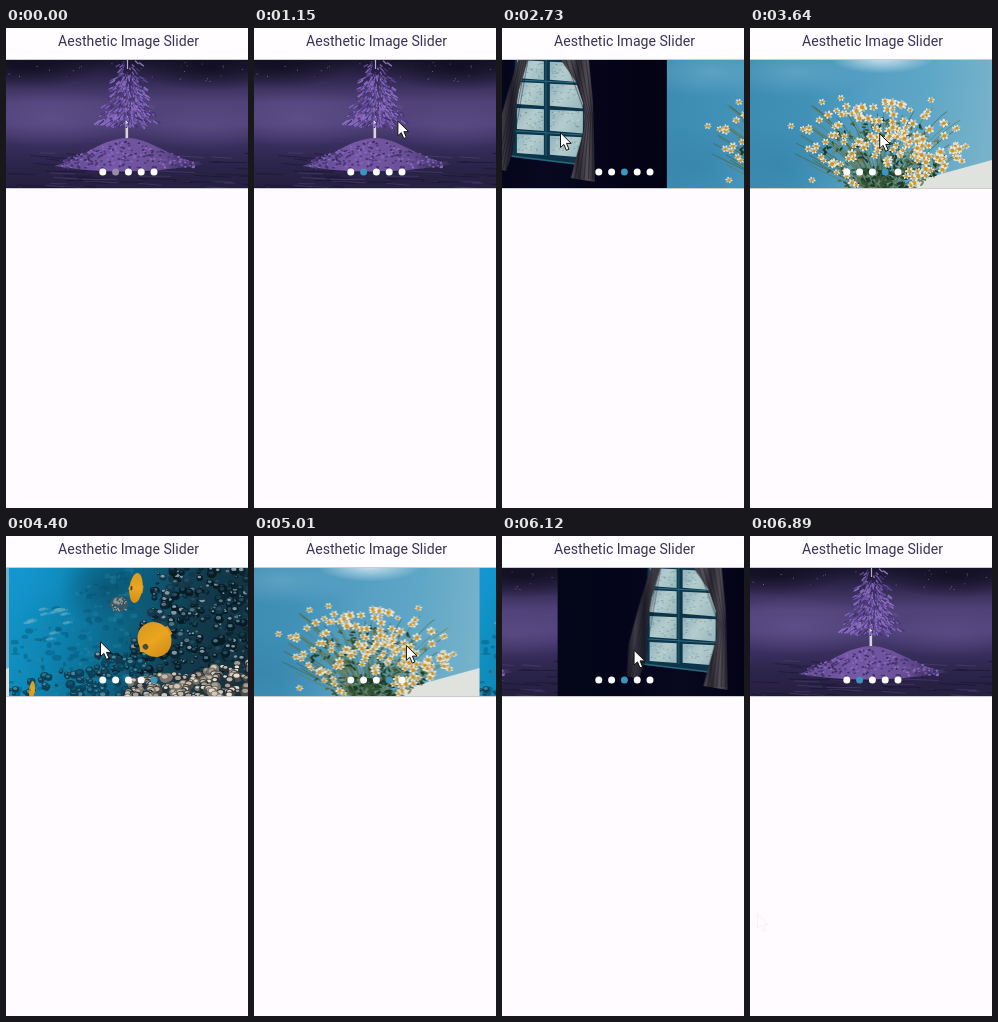
Write an HTML page with a canvas that moves like this. It is 242 by 480 pixels and loops after 8.08 s.

```html
<!DOCTYPE html>
<html lang="en">
<head>
<meta charset="utf-8">
<title>Aesthetic Image Slider</title>
<style>
html, body { margin: 0; width: 100%; height: 100%; overflow: hidden; background: #fffbff; }
#stage { position: relative; width: 242px; height: 480px; overflow: hidden; }
h1 { position: absolute; left: 0; top: 0; width: 245px; height: 31px; margin: 0; text-align: center;
  font: 400 14.1px/28px Roboto, sans-serif; color: #393257; background: #fffdff; white-space: nowrap; }
h1 span { display: block; transform: translateY(-.6px); }
#slider { position: absolute; left: 0; top: 32px; width: 242px; height: 128px; overflow: hidden;
  background: #fffbff; }
#strip { position: absolute; left: 0; top: 0; display: flex; will-change: transform; }
canvas { width: 242px; height: 128px; flex: none; display: block; }
.edge { position: absolute; left: 0; top: 31px; width: 242px; height: 1px; background: #c9cdd0; }
.edge + .edge { top: 160px; }
.dot { position: absolute; left: 0; top: 0; width: 7px; height: 7px; border-radius: 50%; background: #fbfbfb; }
#cursor { position: absolute; left: 0; top: 0; overflow: visible; }
</style>
</head>
<body>
<div id="stage">
  <h1><span>Aesthetic Image Slider</span></h1>
  <div class="edge"></div><div class="edge"></div>
  <div id="slider"><div id="strip"></div></div>
  <svg id="cursor" width="13" height="20" viewBox="0 0 13 20">
    <path d="M.5 .8V15.5L3.9 12.4L6.4 18.3L9 17.2L6.5 11.4H11.2Z" fill="#fff" stroke="#111" stroke-width="1"/>
  </svg>
</div>
<script>
const W = 242, H = 128, LOOP = 8080;
const slider = document.getElementById('slider');
const strip = document.getElementById('strip');
const cursor = document.getElementById('cursor');

function random(seed) {
  return () => {
    seed = (seed * 16807) % 2147483647;
    return seed / 2147483647;
  };
}

function shade(c, x0, y0, x1, y1, colors) {
  const g = c.createLinearGradient(x0, y0, x1, y1);
  colors.forEach((k, i) => g.addColorStop(i / (colors.length - 1), k));
  return g;
}

function poly(c, color, ...pts) {
  c.fillStyle = color;
  c.beginPath();
  for (let i = 0; i < pts.length; i += 2) c.lineTo(pts[i], pts[i + 1]);
  c.closePath();
  c.fill();
}

function oval(c, color, x, y, rx, ry = rx, turn = 0) {
  c.fillStyle = color;
  c.beginPath();
  c.ellipse(x, y, rx, ry, turn, 0, 7);
  c.fill();
}

function glow(c, color, x, y, r, squash) {
  c.save();
  c.translate(x, y);
  c.scale(1, squash);
  const g = c.createRadialGradient(0, 0, 0, 0, 0, r);
  g.addColorStop(0, color);
  g.addColorStop(1, color.replace(/[\d.]+\)$/, '0)'));
  oval(c, g, 0, 0, r);
  c.restore();
}

function line(c, color, width, x0, y0, x1, y1) {
  c.strokeStyle = color;
  c.lineWidth = width;
  c.beginPath();
  c.moveTo(x0, y0);
  c.lineTo(x1, y1);
  c.stroke();
}

function tree(c) {
  const r = random(41);
  c.fillStyle = shade(c, 0, 0, 0, H, ['#17142a', '#342b55', '#514379', '#50427a', '#382e5c', '#2b2449', '#251f40']);
  c.fillRect(0, 0, W, H);
  glow(c, 'rgba(103,86,148,.55)', 45, 58, 75, .4);
  glow(c, 'rgba(98,82,142,.5)', 200, 66, 70, .35);
  glow(c, 'rgba(14,12,28,.75)', 20, 6, 75, .3);
  glow(c, 'rgba(14,12,28,.75)', 205, 8, 75, .3);
  for (let i = 0; i < 40; i++) oval(c, `rgba(205,196,232,${r() * .7})`, r() * W, r() * 22, .5);
  for (let i = 0; i < 60; i++) {
    const x = r() * W, y = 92 + r() * 36;
    line(c, i % 3 ? 'rgba(21,17,40,.5)' : 'rgba(104,86,150,.35)', 1, x, y, x + 10 + r() * 30, y + r() * 2);
  }
  // island
  c.beginPath();
  c.moveTo(48, 106);
  c.bezierCurveTo(78, 98, 92, 80, 120, 78);
  c.bezierCurveTo(146, 78, 162, 98, 198, 104);
  c.quadraticCurveTo(122, 118, 48, 106);
  c.fillStyle = shade(c, 50, 0, 198, 0, ['#5d478c', '#7658a8', '#6c5199', '#392d60']);
  c.fill();
  for (let i = 0; i < 340; i++) {
    const x = 56 + r() * 132, u = Math.abs(x - 120) / 75;
    const top = 80 + 25 * Math.pow(u, 1.25);
    oval(c, ['#8a69ba', '#4d3a78', '#6f53a0', '#3c2f62'][i % 4], x, top + r() * (108 - top), 1.3, .9);
  }
  // branches
  c.fillStyle = '#d9d3df';
  c.fillRect(119.5, 56, 3.5, 22);
  line(c, '#5b4a6d', 1, 122.5, 60, 122.5, 78);
  for (let i = 0; i < 620; i++) {
    const v = Math.sqrt(r()), y = v * 65;
    const half = (11 + v * 19) * (.72 + .28 * Math.sin(y * .75));
    const side = r() * 2 - 1, x = 122 + side * half;
    line(c, ['#7d60b6', '#614893', '#8d70c4', '#44336f'][i % 4], 1.3, x, y, x + side * 5, y + 2 + r() * 2);
  }
  line(c, '#b9aad0', 1.2, 121.5, 0, 121.5, 9);
}

function windowRoom(c) {
  const r = random(87);
  c.fillStyle = shade(c, 0, 0, W, 0, ['#050719', '#04051a', '#080820', '#050418', '#030313']);
  c.fillRect(0, 0, W, H);
  poly(c, '#0d3448', 90, 0, 163, 0, 161, 106, 86, 97);
  const cols = [[92, 119], [125, 158]], rows = [[0, 18], [22, 44], [48, 69], [74, 93]];
  const tilt = x => (x - 92) * .05;
  for (const [a, b] of cols) for (const [t, d] of rows) {
    const fill = shade(c, a, t, b, d, ['#8fb2bc', '#b4ccce', '#98b9bd']);
    poly(c, fill, a, t + tilt(a), b, t + tilt(b), b, d + tilt(b) * 1.4, a, d + tilt(a));
  }
  for (let i = 0; i < 230; i++) {
    const col = cols[i % 2], row = rows[(i >> 1) % 4];
    oval(c, i % 3 ? 'rgba(70,105,112,.4)' : 'rgba(210,226,225,.6)',
      col[0] + 1 + r() * (col[1] - col[0] - 2), row[0] + 3 + r() * (row[1] - row[0] - 4), .9, .6);
  }
  line(c, '#2b7086', 1, 92, 20, 158, 23);
  line(c, '#2b7086', 1, 90, 71, 158, 75);
  line(c, '#256479', 1, 121, 0, 121, 96);
  line(c, '#28677d', 1.5, 86, 96, 160, 105);
  // curtains
  poly(c, shade(c, 68, 0, 96, 0, ['#15141f', '#3d3b44', '#201f2a', '#4a474c']),
    93, 0, 103, 0, 94, 30, 89, 60, 88, 92, 81, 111, 69, 108, 71, 76, 83, 32);
  poly(c, shade(c, 136, 0, 171, 0, ['#37353c', '#57525a', '#2b2933', '#555058', '#26242e']),
    136, 0, 164, 0, 168, 42, 169, 82, 170, 122, 146, 118, 151, 98, 159, 70, 159, 46, 151, 22);
  for (let i = 0; i < 5; i++) {
    line(c, 'rgba(12,11,22,.5)', 1, 141 + i * 5, 0, 161 + i * 1.6, 56);
    line(c, 'rgba(12,11,22,.5)', 1, 161 + i * 1.6, 56, 150 + i * 4.5, 119);
    line(c, 'rgba(10,10,25,.45)', 1, 95 + i * 2, 0, 72 + i * 3, 109);
  }
}

function daisy(c, x, y, s, turn) {
  for (let k = 0; k < 6; k++) {
    const a = turn + k * Math.PI / 3;
    oval(c, k % 3 ? '#eae6d4' : '#bfbeb0', x + Math.cos(a) * s * .62, y + Math.sin(a) * s * .52, s * .42, s * .25, a);
  }
  oval(c, '#cf9524', x, y + .3, s * .43, s * .4);
}

function flowers(c) {
  const r = random(29);
  c.fillStyle = shade(c, 0, 0, W, 30, ['#3d8bb1', '#4090b7', '#559fc3', '#5fa7c7', '#76b2ca']);
  c.fillRect(0, 0, W, H);
  glow(c, 'rgba(120,182,208,.5)', 45, 12, 75, .35);
  glow(c, 'rgba(214,232,240,.95)', 132, -2, 52, .3);
  glow(c, 'rgba(52,128,166,.5)', 25, 105, 70, .6);
  poly(c, '#e0e2de', 150, H, 180, 117, W, 100, W, H);
  for (let i = 0; i < 75; i++) {
    const x = 45 + r() * 170, y = 45 + r() * 60;
    c.strokeStyle = i % 2 ? '#667b50' : '#48643f';
    c.lineWidth = .7;
    c.beginPath();
    c.moveTo(x, y);
    c.quadraticCurveTo(x * .6 + 53, y + 18, 133 + (x - 133) * .15, 130);
    c.stroke();
  }
  for (let i = 0; i < 330; i++) {
    const a = r() * 7, d = Math.sqrt(r());
    oval(c, ['#3b5434', '#56693f', '#1d3a26', '#76825a'][i % 4],
      132 + Math.cos(a) * d * 62, 96 + Math.sin(a) * d * 38, 2.4, 1, r() * 3);
  }
  for (let i = 0; i < 60; i++) oval(c, i % 2 ? '#1d3a26' : '#335433', 112 + r() * 44, 108 + r() * 20, 3, 1.4, r() * 3);
  for (let i = 0; i < 175; i++) {
    const a = r() * 7, d = Math.pow(r(), .55);
    const x = 132 + Math.cos(a) * d * 80, y = 84 + Math.sin(a) * d * 45;
    if (y > 106 && Math.abs(x - 132) < 22 || y > 112 && x > 178) continue;
    daisy(c, x, y, 3.2 + r() * 1.9, a);
  }
  for (const [x, y] of [[41, 66], [53, 69], [72, 42], [91, 38], [207, 68], [216, 86], [212, 101], [62, 120], [181, 40]])
    daisy(c, x, y, 3.6, x);
}

function angel(c, x, y, rx, ry, turn) {
  c.save();
  c.translate(x, y);
  c.rotate(turn);
  poly(c, '#d1901b', rx * .8, -ry * .3, rx * 1.12, -ry * .2, rx * 1.1, ry * .3, rx * .8, ry * .3);
  oval(c, shade(c, 0, -ry, 0, ry, ['#d89a20', '#eba51f', '#d48f18']), 0, 0, rx, ry);
  poly(c, '#e3a024', -rx * .85, -ry * .3, -rx * 1.15, ry * .1, -rx * .8, ry * .4);
  oval(c, '#4a4a3c', -rx * .7, ry * .05, rx * .17, ry * .16);
  c.restore();
}

function reef(c) {
  const r = random(63);
  c.fillStyle = shade(c, 0, 0, W, 70, ['#1398cd', '#0d84b2', '#0c6586', '#103c4d', '#12303c']);
  c.fillRect(0, 0, W, H);
  glow(c, 'rgba(20,150,210,.7)', 5, 5, 75, .6);
  glow(c, 'rgba(10,70,98,.6)', 100, 20, 50, .8);
  const knob = (x, y, s, dark, light) => {
    oval(c, dark, x, y, s, s * .9);
    oval(c, light, x - s * .1, y - s * .3, s * .55, s * .4);
  };
  // far slope
  for (let i = 0; i < 260; i++) {
    const x = r() * 125, y = r() * H;
    if (y < 75 - x * .75) continue;
    oval(c, i % 2 ? 'rgba(8,78,108,.4)' : 'rgba(36,136,165,.35)', x, y, 1 + r() * 4, 1 + r() * 2);
  }
  for (let i = 0; i < 560; i++) {
    const x = 88 + r() * 157, y = r() * 108;
    if (x < 150 - y * .4 + r() * 20 && y < 85) continue;
    knob(x, y, 1.5 + r() * 3.5, ['#0b2431', '#14384a', '#081b25'][i % 3], ['#4f7381', '#234a5a', '#8199a0', '#183c4b'][i % 4]);
  }
  for (let i = 0; i < 190; i++) {
    const x = r() * 140, y = 82 + r() * 46;
    if (y < 118 - x * .28) continue;
    knob(x, y, 1.5 + r() * 3.5, '#0a4158', ['#2a7388', '#0f566f', '#4b8492'][i % 3]);
  }
  // pale coral in front
  for (let i = 0; i < 150; i++) {
    const x = 118 + r() * 126, top = 113 - (x - 118) * .15;
    const y = top + i / 150 * (H + 2 - top);
    knob(x, y, 3 + r() * 2.5, ['#4b4845', '#7b746b', '#22303a'][i % 3], ['#d3c9b9', '#e6decf', '#a79e92', '#c4baaa'][i % 4]);
  }
  knob(110, 36, 9, '#3d5865', '#7d8f91');
  for (let i = 0; i < 45; i++) oval(c, i % 2 ? '#344b55' : '#9aa5a2', 103 + r() * 14, 30 + r() * 13, .8);
  for (let i = 0; i < 13; i++) {
    const x = 18 + r() * 40, y = 40 + r() * 32;
    oval(c, 'rgba(92,172,196,.7)', x, y, 4, 1.5, -.2);
    poly(c, 'rgba(80,160,186,.6)', x + 3, y, x + 6, y - 2, x + 6, y + 1);
  }
  angel(c, 127, 20, 6.5, 15, .12);
  angel(c, 145.5, 71.5, 16.5, 18, -.6);
  angel(c, 23, 122, 2.8, 9, .1);
}

const scale = Math.max(1, window.devicePixelRatio || 1);
for (const paint of [tree, windowRoom, flowers, reef]) {
  const canvas = document.createElement('canvas');
  canvas.width = W * scale;
  canvas.height = H * scale;
  const c = canvas.getContext('2d');
  c.scale(scale, scale);
  paint(c);
  strip.append(canvas);
}

const dots = [0, 1, 2, 3, 4].map(i => {
  const dot = document.createElement('i');
  dot.className = 'dot';
  dot.style.transform = `translate(${93.3 + i * 12.8}px, 108.6px)`;
  slider.append(dot);
  return dot;
});

// swipe start time and direction
const swipes = [[1190, 1], [2600, 1], [3790, 1], [4590, -1], [5380, -1], [6020, -1]];
const DRAG = 135, PULL = 80, SPEED = 700, SLOW = 9.07, FAST = 22;

// finger drag, then an overdamped spring to the next page
function travel(ms) {
  if (ms <= 0) return 0;
  if (ms < DRAG) return PULL * Math.pow(ms / DRAG, 1.2);
  const s = (ms - DRAG) / 1000, rest = W - PULL;
  const a = (FAST * rest - SPEED) / (FAST - SLOW);
  const left = a * Math.exp(-SLOW * s) + (rest - a) * Math.exp(-FAST * s);
  return left < .3 ? W : W - left;
}

// time, x, y of the pointer tip
const path = [
  [330, 180, 402], [600, 115, 270], [830, 17, 105], [1000, 110, 70], [1190, 152, 98],
  [1325, 66, 102], [1400, 62, 102], [2330, 62, 102], [2460, 155, 111], [2600, 152, 110],
  [2730, 58, 104], [3400, 58, 105], [3640, 129, 105], [3790, 162, 107], [3925, 80, 104],
  [4050, 94, 105], [4420, 94, 105], [4590, 62, 106], [4725, 158, 108], [5100, 150, 109],
  [5380, 62, 110], [5515, 150, 112], [5570, 112, 111], [5700, 66, 112], [6020, 62, 112],
  [6155, 155, 114], [6380, 68, 205], [6640, 7, 377]
];

function pointer(t) {
  const i = path.findIndex(k => k[0] > t);
  if (i < 0) return path[path.length - 1].slice(1);
  if (i === 0) return path[0].slice(1);
  const [t0, x0, y0] = path[i - 1], [t1, x1, y1] = path[i];
  const u = (t - t0) / (t1 - t0);
  return [x0 + (x1 - x0) * u, y0 + (y1 - y0) * u];
}

function render(t) {
  const shift = swipes.reduce((sum, [start, dir]) => sum + dir * travel(t - start), 0);
  strip.style.transform = `translateX(${-shift}px)`;
  const active = 1 + Math.round(shift / W);
  dots.forEach((dot, i) => {
    dot.style.background = i !== active ? '#fbfbfb' : t < 1150 ? '#978ca8' : '#3b95bd';
  });
  const [x, y] = pointer(t);
  cursor.style.transform = `translate(${x}px, ${y}px)`;
  cursor.style.opacity = t < 330 ? 0 : t < 6670 ? 1 : .035;
}

const begin = performance.now();
function tick() {
  render((performance.now() - begin) % LOOP);
  requestAnimationFrame(tick);
}
tick();
</script>
</body>
</html>
```
